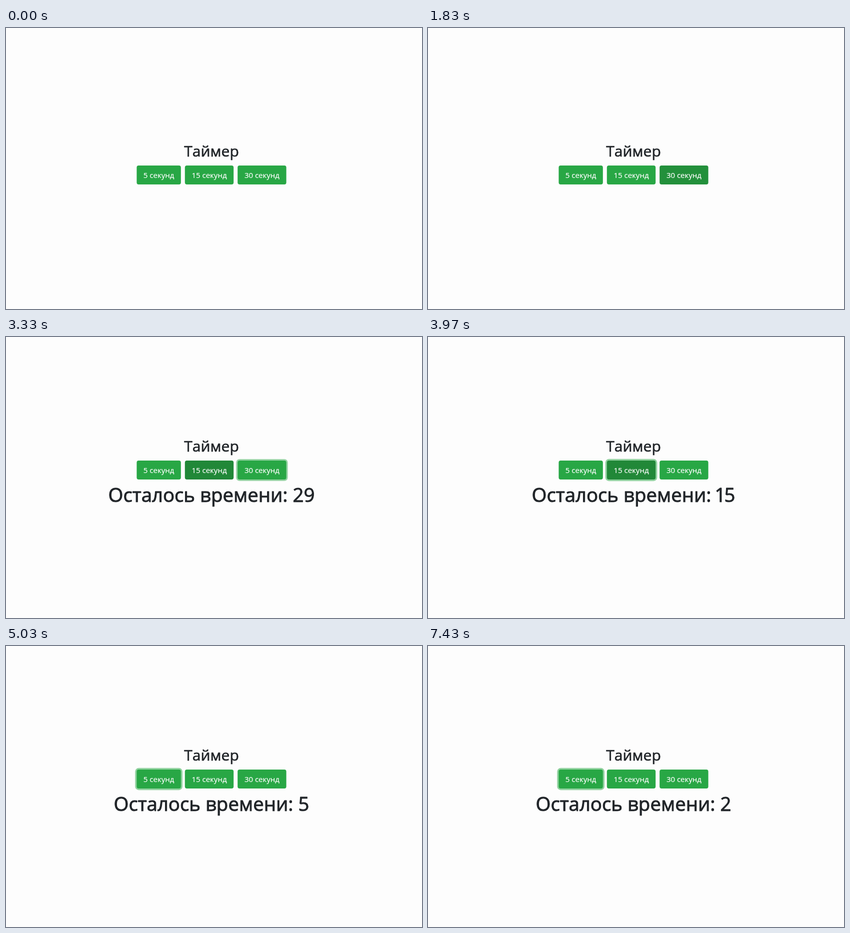
These frames come from a looping animation (832 px wide and 564 px high, 8000 ms). An HTML page:

```html
<!DOCTYPE html>
<html lang="ru">
<head>
<meta charset="utf-8">
<title>Таймер</title>
<style>
  html, body { margin: 0; width: 100%; height: 100%; overflow: hidden; background: #fdfdfd; }
  svg { display: block; width: 832px; height: 564px; }
  text {
    font-family: "Open Sans", "Noto Sans", sans-serif;
    font-weight: 400;
    fill: #212529;
    stroke: #212529;
    stroke-linejoin: round;
    text-anchor: middle;
  }
  /* a thin outline gives the medium weight */
  .title { font-size: 30px; stroke-width: 0.7px; }
  .left { font-size: 38.4px; stroke-width: 1px; }
  .btn text { font-size: 15px; fill: #fff; stroke: #fff; stroke-width: 0.2px; }
  .ring { fill: #28a745; }
</style>
</head>
<body>
<svg viewBox="0 0 832 564">
  <g id="panel">
    <text class="title" x="411" y="258">Таймер</text>
    <g id="buttons"></g>
    <text id="left" class="left" x="411" y="358.6"></text>
  </g>
</svg>
<script>
const LOOP = 8000, FADE = 150, SHOWN = 2030, LIFT = 28;
const BASE = [40, 167, 69], DARK = [33, 136, 56];

// hover and focus: [start time, target value]
const buttons = [
  { label: "5 секунд", x: 261.4, w: 88.4,
    hover: [[4130, 1], [4870, 0]],
    focus: [[4355, 1]] },
  { label: "15 секунд", x: 357.8, w: 97.4,
    hover: [[2800, 1], [3970, 0]],
    focus: [[3310, 1], [4355, 0]] },
  { label: "30 секунд", x: 463.2, w: 97.4,
    hover: [[670, 1], [1600, 0], [1730, 1], [2030, 0]],
    focus: [[1970, 1], [3310, 0]] }
];

const counts = [
  [0, ""], [SHOWN, "30"], [3030, "29"], [3430, "15"],
  [4430, "5"], [5430, "4"], [6430, "3"], [7430, "2"]
];

const panel = document.getElementById("panel");
const left = document.getElementById("left");

function add(parent, tag, attrs) {
  const el = document.createElementNS("http://www.w3.org/2000/svg", tag);
  set(el, attrs);
  parent.appendChild(el);
  return el;
}

function set(el, attrs) {
  for (const key in attrs) el.setAttribute(key, attrs[key]);
}

for (const b of buttons) {
  const g = add(document.getElementById("buttons"), "g", { class: "btn" });
  b.ring = add(g, "rect", { class: "ring" });
  b.face = add(g, "rect", { x: b.x, y: 276, width: b.w, height: 38, rx: 4 });
  add(g, "text", { x: b.x + b.w / 2, y: 301 }).textContent = b.label;
}

function level(steps, t) {
  let value = 0;
  for (const [start, target] of steps) {
    const p = Math.min(1, Math.max(0, (t - start) / FADE));
    value += (target - value) * p * p * (3 - 2 * p);
  }
  return value;
}

function drawButton(b, t) {
  const hover = level(b.hover, t), focus = level(b.focus, t);
  const rgb = BASE.map((c, i) => Math.round(c + (DARK[i] - c) * hover));
  const s = 3.2 * focus;
  b.face.setAttribute("fill", `rgb(${rgb})`);
  set(b.ring, {
    x: b.x - s, y: 276 - s, width: b.w + 2 * s, height: 38 + 2 * s,
    rx: 4 + s, "fill-opacity": 0.5 * focus
  });
}

let shown = null;
function drawCount(t) {
  const n = counts.filter(([start]) => t >= start).pop()[1];
  if (n === shown) return;
  shown = n;
  left.textContent = n && "Осталось времени: ";
  // a leading one sits tighter than the other digits
  if (n) add(left, "tspan", n[0] === "1" ? { dx: "-3 -3" } : {}).textContent = n;
}

function draw(t) {
  panel.setAttribute("transform", `translate(0 ${t >= SHOWN ? -LIFT : 0})`);
  buttons.forEach(b => drawButton(b, t));
  drawCount(t);
}

const begin = performance.now();
function tick(now) {
  draw(Math.max(0, now - begin) % LOOP);
  requestAnimationFrame(tick);
}
draw(0);
requestAnimationFrame(tick);
</script>
</body>
</html>
```
